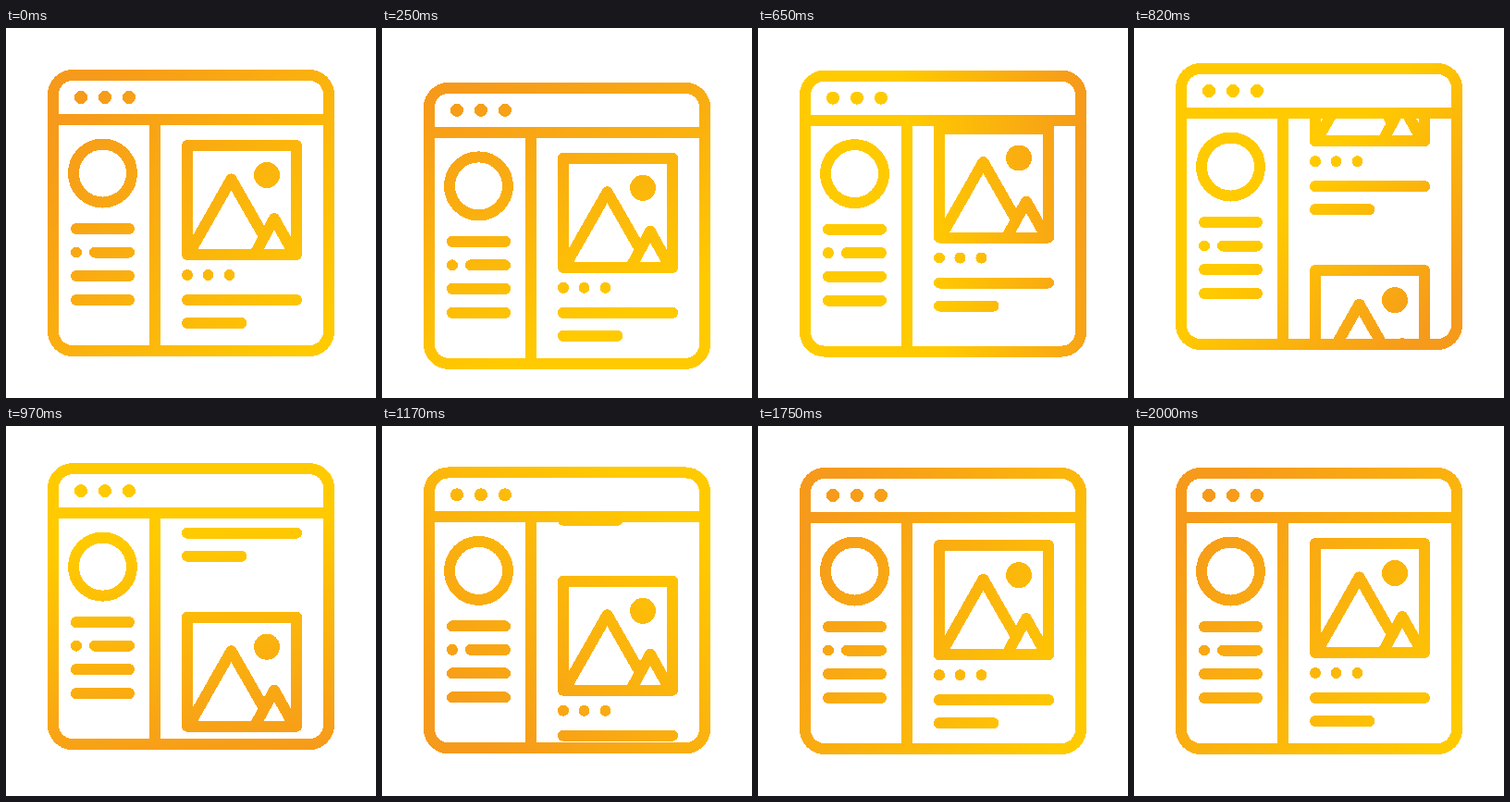
An HTML page without scripts that plays this animation: 400 by 400 pixels, repeating every 2.02 s.

```html
<!DOCTYPE html>
<html lang="en">
<head>
<meta charset="utf-8">
<title>Scrolling page icon</title>
<style>
html, body { margin: 0; width: 100%; height: 100%; overflow: hidden; background: #fff; }
svg { display: block; width: 100vw; height: 100vh; }
.ink { fill: none; stroke: #fff; stroke-width: 12; stroke-linecap: round; stroke-linejoin: round; shape-rendering: crispEdges; }
.dot { fill: #fff; stroke: none; }
</style>
</head>
<body>
<svg viewBox="0 0 400 400">
  <defs>
    <!-- the orange end circles the window once per loop, the yellow end comes close and backs off -->
    <linearGradient id="glow" gradientUnits="userSpaceOnUse" x1="200" y1="30" x2="200" y2="390">
      <stop offset="0" stop-color="#f69a1b"/>
      <stop offset="1" stop-color="#ffca00"/>
      <animateTransform attributeName="gradientTransform" type="rotate" dur="2.02s" repeatCount="indefinite"
        calcMode="spline" keyTimes="0;1" values="-49 200 200;311 200 200" keySplines=".25 0 .5 1"/>
      <animate attributeName="y2" dur="2.02s" repeatCount="indefinite"
        keyTimes="0;.364;.579;1" values="390;200;350;390"/>
    </linearGradient>

    <clipPath id="pane"><rect x="160" y="99" width="189" height="250"/></clipPath>

    <g id="post">
      <rect x="196" y="127" width="118" height="118"/>
      <path d="M200 240 243.5 163.5 277 222M269 244.5 290 206 311.5 244.5"/>
      <path d="M196 294H314M196 319H254.5"/>
      <g class="dot">
        <circle cx="282" cy="159" r="14"/>
        <circle cx="196" cy="267" r="6"/>
        <circle cx="218.5" cy="267" r="6"/>
        <circle cx="241.5" cy="267" r="6"/>
      </g>
    </g>

    <mask id="art" maskUnits="userSpaceOnUse" x="0" y="0" width="400" height="400">
      <g class="ink">
        <!-- dip, spring up, settle -->
        <animateTransform attributeName="transform" type="translate" dur="2.02s" repeatCount="indefinite"
          calcMode="spline" keyTimes="0;.186;.401;.619;1"
          values="0 0;0 15;0 -7;0 0;0 0"
          keySplines=".33 0 .2 1;.8 0 .43 1;.33 0 .67 1;0 0 1 1"/>

        <!-- window and sidebar -->
        <rect x="51" y="51" width="298" height="298" rx="21"/>
        <path d="M51 99H349M160.5 99V349"/>
        <circle cx="104.5" cy="157" r="31.5"/>
        <path d="M76 217H133M96 242.5H133M76 268H133M76 294H133"/>
        <g class="dot">
          <circle cx="81" cy="75" r="7"/>
          <circle cx="107" cy="75" r="7"/>
          <circle cx="133" cy="75" r="7"/>
          <circle cx="76" cy="242.5" r="6"/>
        </g>

        <!-- scroll by one post: quick start, long glide -->
        <g clip-path="url(#pane)">
          <g>
            <animateTransform attributeName="transform" type="translate" dur="2.02s" repeatCount="indefinite"
              calcMode="spline" keyTimes="0;.277;.406;.99;1"
              values="0 0;0 0;0 -115.4;0 -258;0 -258"
              keySplines="0 0 1 1;.4 0 .8 .75;.16 .62 .35 1;0 0 1 1"/>
            <use href="#post"/>
            <use href="#post" y="258"/>
          </g>
        </g>
      </g>
    </mask>
  </defs>
  <rect width="400" height="400" fill="url(#glow)" mask="url(#art)"/>
</svg>
</body>
</html>
```
